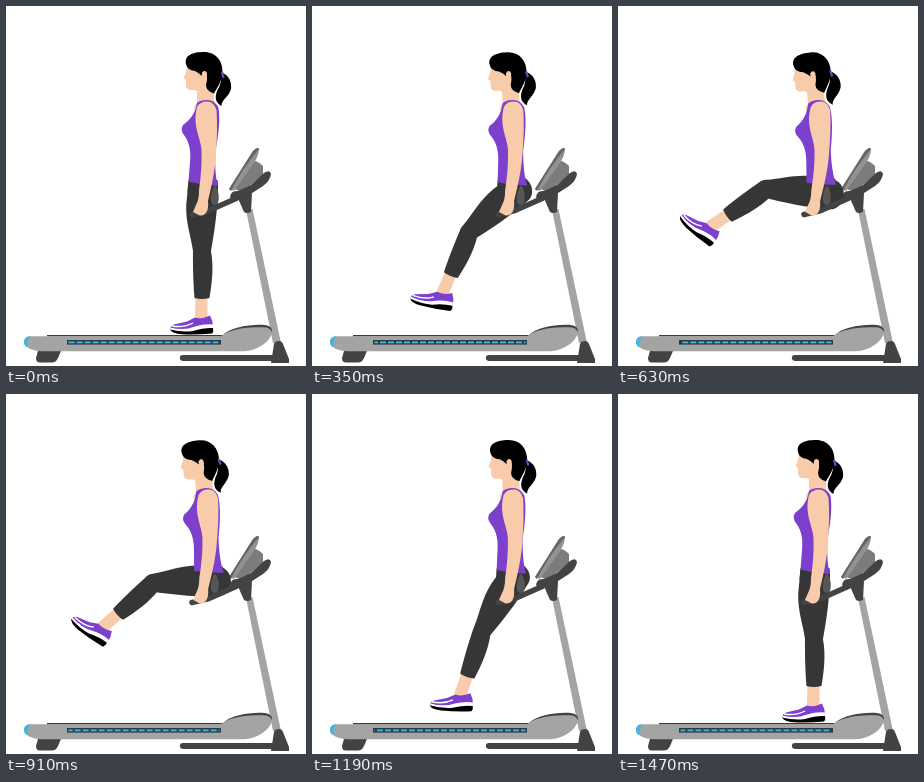
An HTML page for the animation above (1540 ms loop, 300 px wide and 360 px high).

```html
<!DOCTYPE html>
<html lang="en">
<head>
<meta charset="utf-8">
<title>Treadmill leg raise</title>
<style>
  html, body { margin: 0; width: 100%; height: 100%; overflow: hidden; background: #fff; }
  svg { display: block; width: 100vw; height: 100vh; }
  .skin { fill: #f8cbaa; }
  .top { fill: #7c40cd; }
  .pants { fill: #363636; }
  .steel { fill: #a4a4a4; }
  .dark { fill: #434344; }
  .white { fill: #fff; }
</style>
</head>
<body>
<svg viewBox="0 0 300 360">
  <!-- treadmill -->
  <g>
    <path class="dark" d="M32 345H55L52 352Q50 356.500 46 356.500H34Q30 356.500 30 352Z"/>
    <path class="dark" d="M177 349H268V355H177Q173 354 174 351Q174 349 177 349Z"/>
    <path class="steel" d="M240 204L246.500 203L275 337H267Z"/>
    <path d="M41 329.800H222" stroke="#3b3b3b" stroke-width="1.500"/>
    <path class="dark" d="M216 330C224 321 244 318 259 319Q266 320 266 325L262 332Z"/>
    <path class="steel" d="M24 330.300H215C221 325 236 320.500 256 321.300Q265 321 266 327C263 337 251 344.500 238 345.300H36C26 345 18 341 18 336Q18 331 24 330.300Z"/>
    <path d="M24 330.300Q18 331 18 336Q18 339.500 21 341Q21 335 24 330.300Z" fill="#40b7df"/>
    <rect x="61" y="334" width="154" height="4.600" fill="#2f3a42"/>
    <path id="belt" d="M62.500 336.300H213.500" stroke="#43b9e6" stroke-width="1.800" stroke-dasharray="6 2"/>
    <path class="dark" d="M268 338Q269 335 273 335Q276 335 277 338L283 353V357H265Z"/>
    <path class="dark" d="M231 190L246 187L245 206Q241 208 238 206Z"/>
    <path d="M226 182L245 155Q251 154 257 160L257 169L236 186Z" fill="#7c7c7c"/>
    <path d="M223 183L247 145Q252 140 253 143Q253 149 248 157L228 185Z" fill="#929292"/>
    <path d="M223 183L247 145Q252 140 253 143Q236 163 225 185Z" fill="#666"/>
    <path class="dark" d="M224 191Q225 184 232 185L245 179L258 167Q264 163 265 168Q264 175 257 180L243 189L228 196Z"/>
  </g>

  <!-- legs -->
  <g id="thigh">
    <g id="shin">
      <path class="skin" d="M-6.500 43H5.500L5.500 68H-7Z"/>
      <g id="foot">
        <path class="top" d="M-7 4Q0 6 8 2Q11 7 11 13L-6 17H-31Q-33 13 -28 11L-15 8Z"/>
        <path d="M-30 12.500Q-18 14.500 -9 9.500" fill="none" stroke="#fff" stroke-width="1.400"/>
        <path class="white" d="M-32 14Q-18 17.500 -7 13Q3 10 11 11V15L-6 18.500H-30Z"/>
        <path d="M-32 16Q-20 19 -9 17.500Q2 14 11 14.500Q12 18 10 20Q-6 21.500 -20 20.800Q-30 20 -32 16Z"/>
      </g>
      <path class="pants" d="M-9 0C-9 14 -9 28 -7.500 47Q0 49 7.500 47C10 32 12 16 9 0Z"/>
    </g>
    <path class="pants" d="M-15 -5A15 13 0 0 1 15 -5C15 20 12 42 9 60A9 9 0 0 1 -9 60C-11 46 -17 32 -16.500 14Z"/>
  </g>

  <!-- upper body -->
  <g id="body">
    <path class="pants" d="M182.500 174H211.500L212 189Q205 195 197 194Q183 192 181.500 185Z"/>
    <path class="skin" d="M191 80H208V97L212 104L190 110L188 101L191 97Z"/>
    <path class="top" d="M191 97C189 108 184 114 177 119Q174 124 178 129C184 137 185 146 184 156L182.500 175.500Q196 179 212 180C209 170 209 156 209.500 145Q215 116 212.500 102Q209 94 201 94Q194 94 191 97Z"/>
    <path class="skin" d="M182 56L180 66L177.500 72L180 74L180 80Q181 85 187 84L198 87L205 65L197 54Z"/>
    <path d="M180 58C178 49 187 46 198 46C210 46 217 55 216.500 67C215 78 210 83 208 87.500Q200 85 200 79Q203 68 198 65Q195 67 196 70Q193 67 189 65Q181 64 180 58Z"/>
    <path d="M217 67C223 70 226 76 225 83C223 91 215 94 215.500 100C210 97 208 92 211.500 84Q216 77 214.500 70Z"/>
    <path d="M216 66L217.500 72" stroke="#7c40cd" stroke-width="2.200"/>
    <path class="skin" d="M196 67Q199 63 201 67Q201 73 198 76Z"/>
  </g>

  <!-- grip and arm -->
  <path d="M209 179Q215 188 211.500 199Q207 200 205 196Q204 186 209 179Z" fill="#565656"/>
  <path d="M186 208.500L203 204.500L230 192.500" fill="none" stroke="#434344" stroke-width="5.500" stroke-linecap="round" stroke-linejoin="round"/>
  <path id="arm" class="skin" d="M191 101Q194 95.500 201 95.500Q208 95.500 210.500 104C211.500 118 211 134 210 148C209 166 205 182 202 195Q203 204 199 208Q195 211 191 208L187 206L190 199Q193 194 193 184C195 170 196 158 195.500 144C195 132 186 120 191 101Z"/>
</svg>
<script>
  const LOOP = 1540, STEP = 70;
  const part = id => document.getElementById(id);
  const [thigh, shin, foot, body, arm, belt] =
    ['thigh', 'shin', 'foot', 'body', 'arm', 'belt'].map(part);

  // lift amount, then thigh, shin and foot angles
  const poses = [
    [0, 1, 0, 0],
    [.095, 9, 4, 0],
    [.345, 31, 18, 3],
    [.5, 49, 23, 12],
    [.905, 89, 48, 36],
    [.976, 95, 55, 40],
    [1, 97, 56, 41]
  ];

  function poseAt(p) {
    let i = 1;
    while (i < poses.length - 1 && poses[i][0] < p) i++;
    const a = poses[i - 1], b = poses[i];
    const f = (p - a[0]) / (b[0] - a[0]);
    return a.map((v, j) => v + (b[j] - v) * f);
  }

  const set = (el, value) => el.setAttribute('transform', value);

  function draw(now) {
    const k = Math.floor((now % LOOP) / STEP);
    const p = (1 - Math.cos(Math.PI * Math.min(k, 21 - k) / 10)) / 2;
    const [, t, s, f] = poseAt(p);
    set(thigh, `translate(${197 + 11 * p} ${185 + 3 * p}) rotate(${t})`);
    set(shin, `translate(0 60) rotate(${s - t})`);
    set(foot, `translate(0 62.5) rotate(${f - s})`);
    set(body, `rotate(${-5.2 * p} 200 108)`);
    set(arm, `rotate(${p} 196 204)`);
    belt.setAttribute('stroke-dashoffset', -k * 24 / 22);
  }

  const start = performance.now();
  function tick() {
    draw(performance.now() - start);
    requestAnimationFrame(tick);
  }
  tick();
</script>
</body>
</html>
```
